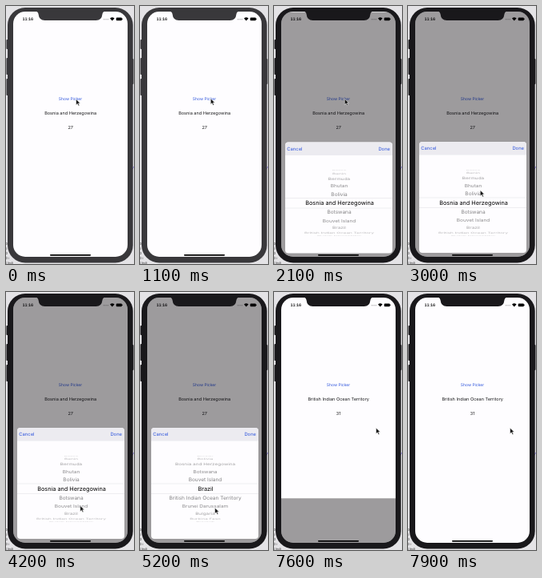
These frames come from a looping animation (160 by 323 pixels, 8000 ms). An HTML page:

```html
<!DOCTYPE html>
<html lang="en">
<head>
<meta charset="utf-8">
<title>Country picker</title>
<style>
  html, body { margin: 0; width: 100%; height: 100%; overflow: hidden; background: #e4e3e6; }
  svg { display: block; width: 160px; height: 323px; }
  text { font-family: Inter, "Liberation Sans", sans-serif; text-rendering: geometricPrecision; }
  .mid { text-anchor: middle; }
  .label { fill: #1c1c1e; }
  .blue { fill: #2f55dc; }
  .clock { font-size: 4.8px; font-weight: 600; font-variant-numeric: tabular-nums; }
  .mono { font: 4px "DejaVu Sans Mono", monospace; fill: #333; }
</style>
</head>
<body>
<svg id="stage" viewBox="0 0 160 323">
  <defs>
    <clipPath id="screen"><rect x="9" y="7" width="143" height="307" rx="15"/></clipPath>
    <clipPath id="band"><rect x="14" y="240" width="134" height="12.500"/></clipPath>
    <clipPath id="around"><path d="M14 188h134v52h-134zM14 252.500h134v56h-134z"/></clipPath>
  </defs>

  <rect width="160" height="323" fill="#e4e3e6"/>
  <path d="M156 207l4-6" stroke="#8a7be0" stroke-width="1"/>
  <g class="mono">
    <text x="-.5" y="299">0</text><text x="-.5" y="305">t</text>
    <text x="-.5" y="311">0</text><text x="-.5" y="317">0 i</text>
    <text x="-.5" y="323">t Indi</text>
  </g>

  <g fill="currentColor">
    <rect x=".5" y="42" width="4" height="12" rx="1"/>
    <rect x=".5" y="65" width="4" height="21" rx="1"/>
    <rect x=".5" y="91" width="4" height="21" rx="1"/>
    <rect x="155" y="66" width="4.500" height="32" rx="1"/>
    <rect x="2" y="2" width="156.700" height="319.500" rx="22"/>
  </g>

  <g clip-path="url(#screen)">
    <rect x="9" y="7" width="143" height="307" fill="#fefdff"/>
    <text class="clock" x="20.500" y="17.900">11:16</text>
    <g fill="#777">
      <circle cx="122.200" cy="16.700" r=".5"/><circle cx="124" cy="16.700" r=".5"/>
      <circle cx="125.800" cy="16.700" r=".5"/><circle cx="127.600" cy="16.700" r=".5"/>
    </g>
    <path d="M130 15.500q2.800-2.600 5.600 0l-2.800 2.900z"/>
    <rect x="137.700" y="14.500" width="7.200" height="3.700" rx="1"/>
    <rect x="145.200" y="15.700" width=".7" height="1.300"/>
    <text id="show" class="mid blue" x="80.500" y="117.500" font-size="5">Show Picker</text>
    <text id="country" class="mid label" x="80.700" y="136.300" font-size="5.550"></text>
    <text id="code" class="mid label" x="80.700" y="154" font-size="5.550"></text>

    <g id="modal">
      <rect x="9" y="7" width="143" height="308" fill="#030005" opacity=".39"/>
      <rect x="14" y="170" width="134" height="139" rx="4" fill="#fefdff"/>
      <path d="M14 186.500v-12.500a4 4 0 0 1 4-4h126a4 4 0 0 1 4 4v12.500z" fill="#ecebf0"/>
      <text class="blue" x="16.300" y="180.300" font-size="5.850">Cancel</text>
      <text id="done" class="blue" x="145" y="180.300" font-size="5.850" text-anchor="end">Done</text>
      <g clip-path="url(#around)"><g id="outer"></g></g>
      <g clip-path="url(#band)"><g id="inner"></g></g>
      <path d="M14 240h134M14 252.500h134" stroke="#dddce0" stroke-width=".5"/>
    </g>
    <rect x="55" y="311" width="51" height="1.700" rx=".85"/>
  </g>
  <path d="M36 6.500h89q-4 0-4.500 3.500q-.8 8-8 8h-64q-7.200 0-8-8q-.5-3.500-4.500-3.500z" fill="currentColor"/>
  <path id="cursor" d="M-.4-.8v7.200l1.700-1.600l1.300 2.700l1.200-.6l-1.300-2.600h2.300z" fill="#111" stroke="#fff" stroke-width=".5"/>
</svg>

<script>
const LOOP = 8000, STEP = 100;
const FIRST = 22, START = 27, END = 31;
const names = ["Belize", "Benin", "Bermuda", "Bhutan", "Bolivia", "Bosnia and Herzegowina",
  "Botswana", "Bouvet Island", "Brazil", "British Indian Ocean Territory", "Brunei Darussalam",
  "Bulgaria", "Burkina Faso", "Burundi", "Cambodia"];

const $ = id => document.getElementById(id);
const set = (el, attrs) => { for (const k in attrs) el.setAttribute(k, attrs[k]); };
const ease = p => p * p * (3 - 2 * p);

// Interpolates rows of [time, ...values]
function track(rows, t) {
  if (t <= rows[0][0]) return rows[0].slice(1);
  for (let i = 1; i < rows.length; i++) {
    const a = rows[i - 1], b = rows[i];
    if (t <= b[0]) {
      const p = ease((t - a[0]) / (b[0] - a[0]));
      return a.slice(1).map((v, j) => v + (b[j + 1] - v) * p);
    }
  }
  return rows[rows.length - 1].slice(1);
}

const cursorPath = [[0, 88, 117.5], [100, 88.5, 117], [1000, 88.5, 117], [1100, 88.7, 116.7],
  [2300, 88.7, 117.2], [3200, 91, 248], [4100, 93, 267.5], [4500, 94, 273], [5200, 94, 271],
  [5900, 94, 258], [6200, 94, 258], [6900, 151, 156], [7100, 128, 171]];
const wheelPath = [[4400, 27], [4950, 30], [6000, 30], [6450, 31]];
const showFade = [[1400, 1], [1500, .3], [2000, 1]];
const doneFade = [[7200, 1], [7300, .3], [7800, 1]];

// Critically damped spring, 1 at the start and 0 at rest
function spring(t) {
  const x = Math.max(0, t) * .01826;
  return (1 + x) * Math.exp(-x);
}

function makeRows(group, size) {
  return names.map(name => {
    const el = document.createElementNS("http://www.w3.org/2000/svg", "text");
    el.textContent = name;
    set(el, { class: "mid", "font-size": size });
    return group.appendChild(el);
  });
}
const outer = makeRows($("outer"), 6.55), inner = makeRows($("inner"), 7.3);

function drawWheel(pos) {
  names.forEach((_, i) => {
    const d = FIRST + i - pos, a = d * .272, c = Math.cos(a);
    const shown = Math.abs(a) < 1.45;
    set(outer[i], {
      visibility: shown ? "inherit" : "hidden",
      opacity: .1 + .4 * c,
      transform: `translate(81.5 ${246.3 + 42 * Math.sin(a)}) scale(${.93 + .07 * c} ${c}) translate(0 2.4)`
    });
    set(inner[i], {
      visibility: Math.abs(d) < 1.6 ? "inherit" : "hidden",
      transform: `translate(82 ${246.3 + 46 * Math.sin(a)}) scale(1 ${c}) translate(0 2.6)`
    });
  });
}

function draw(t) {
  const code = t < 7400 ? START : END;
  // The bezel darkens once the window takes focus
  $("stage").style.color = t < 1500 ? "#39383b" : "#19181b";
  $("country").textContent = names[code - FIRST];
  $("code").textContent = code;
  $("show").setAttribute("opacity", track(showFade, t));
  $("done").setAttribute("opacity", track(doneFade, t));
  const away = t < 7430 ? spring(t - 1631) : 1 - spring(t - 7430);
  $("modal").setAttribute("transform", `translate(0 ${308 * away})`);
  drawWheel(track(wheelPath, t)[0]);
  $("cursor").setAttribute("transform", `translate(${track(cursorPath, t).join(" ")})`);
}

const origin = performance.now();
function tick() {
  const t = (performance.now() - origin) % LOOP;
  draw(Math.floor(t / STEP) * STEP);
  requestAnimationFrame(tick);
}
tick();
</script>
</body>
</html>
```
